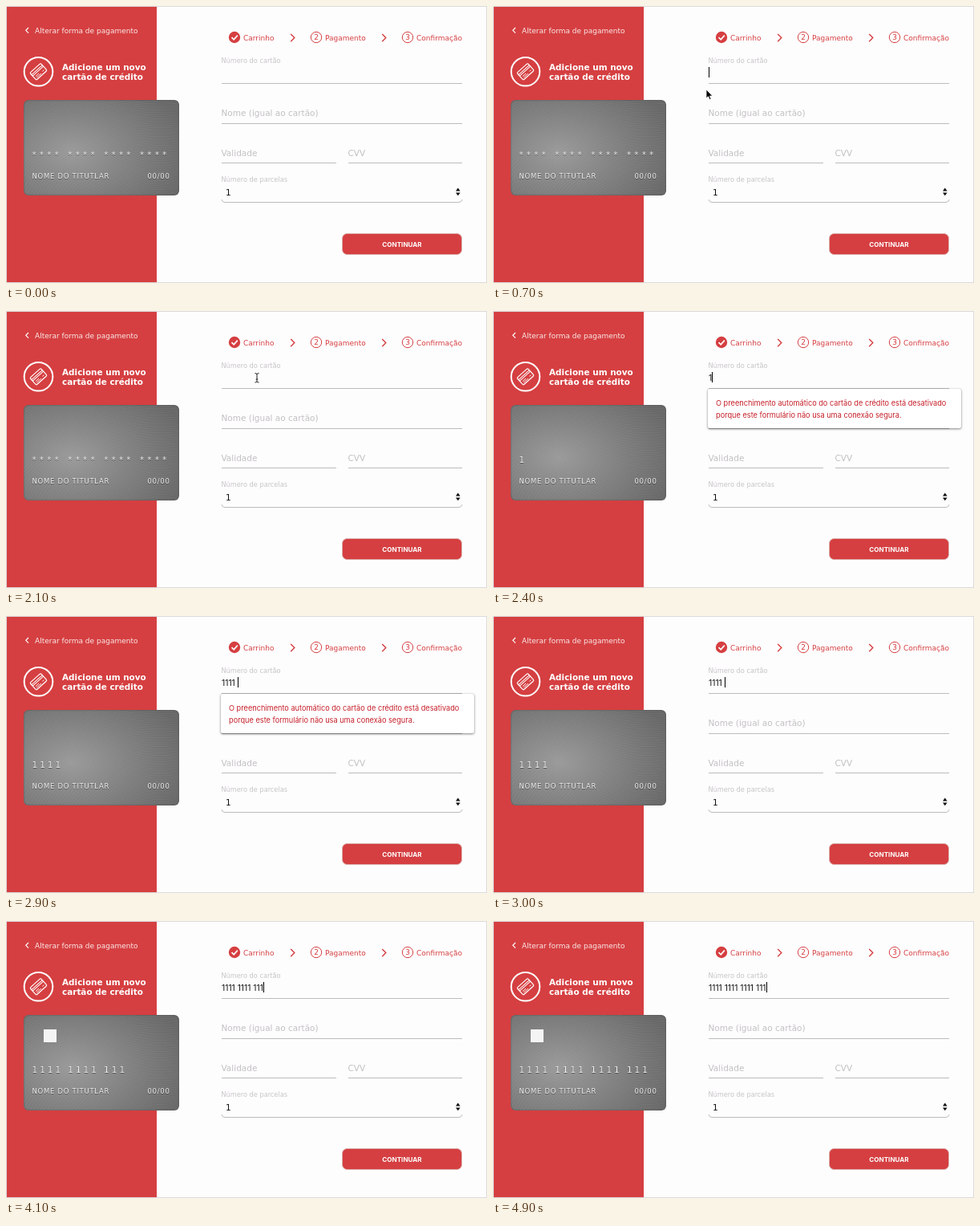
Recreate the animation shown at these times as an HTML page. Size 600 by 345 pixels, loop 5 s.

```html
<!DOCTYPE html>
<html lang="pt-BR">
<head>
<meta charset="utf-8">
<title>Cartão de crédito</title>
<style>
  html, body { margin: 0; width: 100%; height: 100%; overflow: hidden; background: #fefdfe; }
  #stage { position: relative; width: 600px; height: 345px; overflow: hidden; }
  svg { position: absolute; left: 0; top: 0; }
  text { font-family: "DejaVu Sans", sans-serif; white-space: pre; }
  .ui { font-family: Inter, sans-serif; }
  .step { font-size: 9px; fill: #d53f41; }
  .hint { font-size: 10.5px; fill: #c2c0c2; }
  .label { font-size: 8.2px; fill: #c6c4c6; }
  .title { font-size: 10.45px; font-weight: bold; fill: #fff; }
  .rule { fill: none; stroke: #bdbbbd; }
  .line { fill: none; stroke: #d53f41; }

  #card {
    position: absolute; left: 22px; top: 117px; width: 194px; height: 119px; border-radius: 6px;
    background:
      repeating-radial-gradient(ellipse 160px 110px at 88% 130%, #fff0 0 2px, #ffffff0c 3px, #fff0 4px),
      radial-gradient(ellipse 150px 100px at 31% 55%, #9a9a9a, #838383 45%, #686868 100%);
    box-shadow: inset 0 0 2px #444;
  }
  .emboss { fill: #eee; filter: drop-shadow(0 1px 0.6px #333a); }
  #cardNumber { font-size: 10.5px; letter-spacing: 2.95px; }
  #cardNumber.mask { letter-spacing: 4.1px; }
  .holder { font-size: 8.5px; letter-spacing: .7px; }

  #field {
    position: absolute; left: 269px; top: 76px; height: 14px; white-space: pre;
    font: 10.3px/14px Inter, sans-serif; color: #111;
  }
  #caret { display: inline-block; width: 1px; height: 13px; background: #000; vertical-align: top; }

  #popup {
    position: absolute; left: 268px; top: 97px; width: 316px; height: 49px; box-sizing: border-box;
    padding: 11px 0 0 10px; border-radius: 2px; background: #fff; white-space: pre;
    box-shadow: 0 1px 3px #0007, 0 0 1px #0005;
    font: 9.2px/14.5px Inter, sans-serif; color: #c5202a;
    animation: popup 5s step-end infinite;
  }
  #brand { animation: brand 5s step-end infinite; }
  #pointer { animation: glide 5s linear infinite; }
  #arrow { animation: arrow 5s step-end infinite; }
  #beam { animation: beam 5s step-end infinite; }

  @keyframes popup { 0%, 60%, 100% { visibility: hidden; } 46% { visibility: visible; } }
  @keyframes brand { 0%, 100% { visibility: hidden; } 72% { visibility: visible; } }
  @keyframes arrow { 0%, 18%, 100% { visibility: hidden; } 2% { visibility: visible; } }
  @keyframes beam { 0%, 48%, 100% { visibility: hidden; } 18% { visibility: visible; } }
  @keyframes glide {
    0%, 2% { transform: translate(292px, 290px); animation-timing-function: ease-out; }
    14% { transform: translate(266px, 104px); animation-timing-function: ease-in-out; }
    22%, 100% { transform: translate(313px, 83px); }
  }
</style>
</head>
<body>
<div id="stage">
  <svg width="600" height="345">
    <rect width="188" height="345" fill="#d53f41"/>
    <path d="M28 27L24.8 30.3L28 33.6" fill="none" stroke="#fff" stroke-width="1.2"/>
    <text x="36" y="33.6" font-size="9" fill="#fbe9e9">Alterar forma de pagamento</text>

    <g fill="none" stroke="#fff">
      <circle cx="40.5" cy="81.8" r="17.8" stroke-width="2"/>
      <g transform="translate(40.5 81.8) rotate(-42)">
        <rect x="-9" y="-6" width="18" height="12" rx="1.5" stroke-width="1.2"/>
        <path d="M-9 -2.8H9M-9 -.8H9" stroke-width="1"/>
        <path d="M-6.5 2H-1M-6.5 4H1M4 3H6.5" stroke-width=".9"/>
      </g>
    </g>
    <text class="title" x="70" y="80">Adicione um novo</text>
    <text class="title" x="70" y="92.4">cartão de crédito</text>

    <circle cx="285" cy="39" r="7.2" fill="#d53f41"/>
    <path d="M281.5 39.2L284.2 41.8L288.8 36.6" fill="none" stroke="#fff" stroke-width="1.7"/>
    <g class="line" stroke-width="1.4">
      <path d="M355.2 35L359.8 39.6L355.2 44.2"/>
      <path d="M469.2 35L473.8 39.6L469.2 44.2"/>
    </g>
    <g class="line">
      <circle cx="387" cy="39" r="6.7"/>
      <circle cx="501" cy="39" r="6.7"/>
    </g>
    <g class="step">
      <text x="296" y="42.6">Carrinho</text>
      <text x="398" y="42.6">Pagamento</text>
      <text x="512" y="42.6">Confirmação</text>
      <g text-anchor="middle">
        <text x="387" y="42.3">2</text>
        <text x="501" y="42.3">3</text>
      </g>
    </g>

    <text class="label" x="268.5" y="70.6">Número do cartão</text>
    <text class="hint" x="268.5" y="137">Nome (igual ao cartão)</text>
    <text class="hint" x="268.5" y="187">Validade</text>
    <text class="hint" x="426.5" y="187">CVV</text>
    <text class="label" x="268.5" y="218.8">Número de parcelas</text>
    <text x="274" y="235.6" font-size="10.5" fill="#111">1</text>
    <path class="rule" d="M269 96.5H569M269 146.5H569M269 195.5H412M427 195.5H569"/>
    <path class="rule" d="M269 241Q269.5 244.5 273 244.5H565Q568.5 244.5 569 241"/>
    <path d="M561 230.4L563.8 226.6L566.6 230.4ZM561 232.4L563.8 236.2L566.6 232.4Z" fill="#111"/>

    <rect x="419.5" y="283.5" width="149" height="26" rx="6" fill="#d53f41" stroke="#d9b0ac"/>
    <text class="ui" x="494" y="299.9" font-size="8.1" font-weight="700" fill="#fff" text-anchor="middle">CONTINUAR</text>
  </svg>

  <div id="card"></div>
  <svg width="600" height="345">
    <rect id="brand" x="47" y="135" width="16" height="16" fill="#f4f4f4"/>
    <g class="emboss">
      <text id="cardNumber" x="32.5" y="189"></text>
      <text class="holder" x="32.5" y="214.6">NOME DO TITUTLAR</text>
      <text class="holder" x="176.5" y="214.6">00/00</text>
    </g>
  </svg>

  <div id="field"><span id="digits"></span><i id="caret"></i></div>
  <div id="popup">O preenchimento automático do cartão de crédito está desativado
porque este formulário não usa uma conexão segura.</div>

  <svg width="600" height="345">
    <g id="pointer">
      <path id="arrow" d="M0 0V11L2.5 8.7L4.2 12.6L6 11.8L4.4 8.1H7.8Z" fill="#000" stroke="#fff" stroke-width=".8"/>
      <path id="beam" d="M-2.5 -5.5Q0 -5.5 0 -4Q0 -5.5 2.5 -5.5M0 -4V4.5M-2.5 6Q0 6 0 4.5Q0 6 2.5 6M-1.3 2H1.3" fill="none" stroke="#222"/>
    </g>
    <rect x=".5" y=".5" width="599" height="344" fill="none" stroke="#dcdadc"/>
  </svg>
</div>
<script>
  const LOOP = 5000, BLINK = 500;
  const keyTimes = [2400, 2500, 2700, 2800, 3100, 3300, 3500, 3600, 3700, 3900, 4100, 4300, 4500, 4700, 4800];
  const byId = id => document.getElementById(id);
  const digits = byId("digits"), caret = byId("caret"), cardNumber = byId("cardNumber");
  const group = n => "1".repeat(n).replace(/.{4}/g, "$& ");
  const start = performance.now();
  let shown = -1;

  function draw() {
    const t = (performance.now() - start) % LOOP;
    const count = keyTimes.filter(k => k <= t).length;
    if (count !== shown) {
      shown = count;
      digits.textContent = group(count);
      cardNumber.textContent = count ? group(count) : "**** **** **** ****";
      cardNumber.classList.toggle("mask", !count);
    }
    // The caret blinks while idle and stays lit while typing.
    const lit = count > 0 || Math.floor(t / BLINK) % 2 === 1;
    caret.style.visibility = lit ? "visible" : "hidden";
    requestAnimationFrame(draw);
  }
  draw();
</script>
</body>
</html>
```
